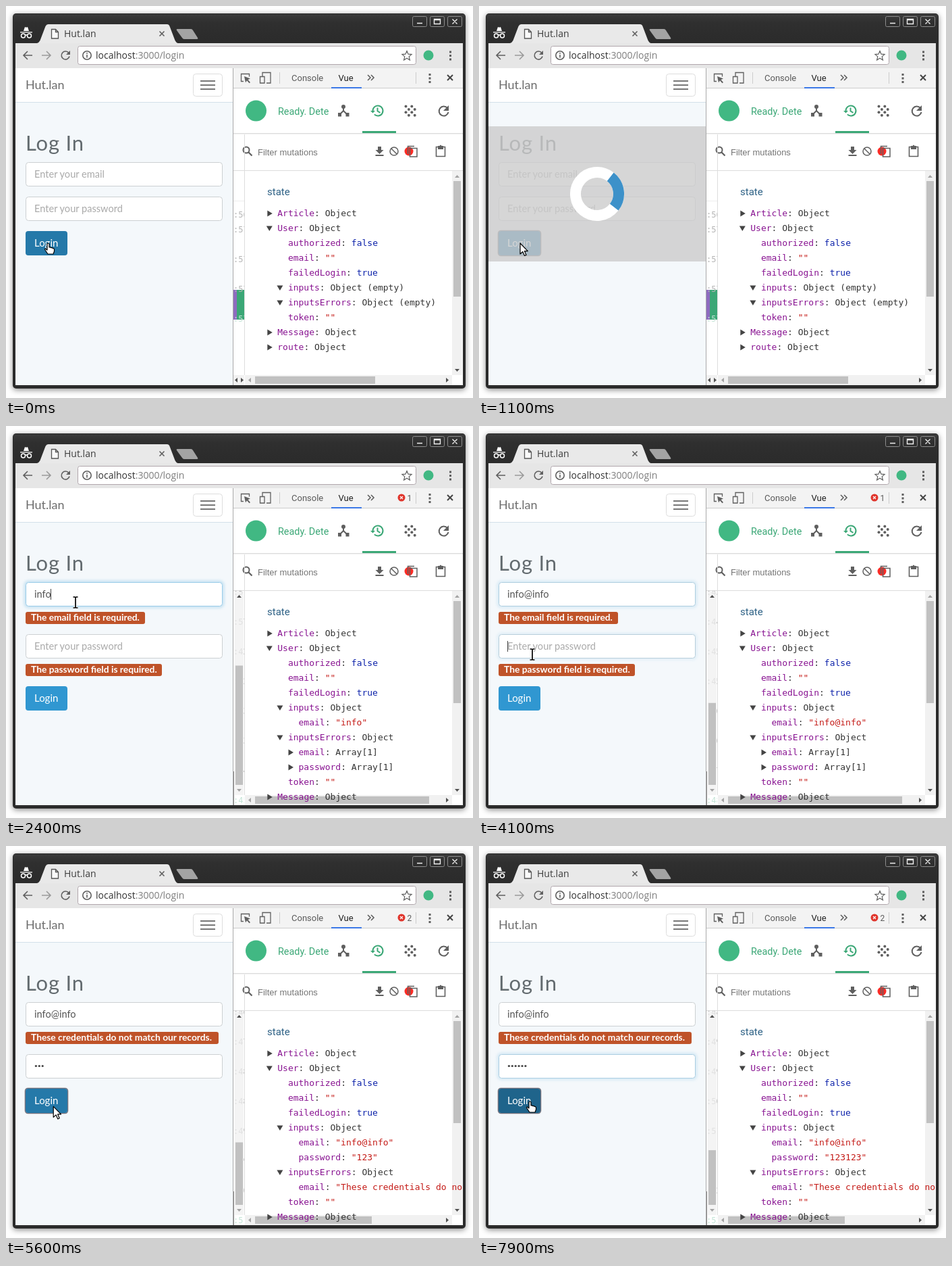
Animation of 692x580 px, one loop 8 s. Source, as an HTML page:

```html
<!DOCTYPE html>
<html lang="en">
<head>
<meta charset="utf-8">
<title>Login</title>
<style>
  html, body { margin: 0; width: 692px; height: 580px; overflow: hidden; background: #fefefe; }
  svg { display: block; }
  text { white-space: pre; }
  .ui { font-family: "Open Sans", sans-serif; font-size: 14px; }
  .page { font-family: Lato, sans-serif; font-size: 14.6px; fill: #555; }
  .tool { font-family: Roboto, sans-serif; font-size: 13px; fill: #5a5a5a; }
  .mono { font-family: "DejaVu Sans Mono", monospace; font-size: 13px; fill: #333; }
  .label { font-size: 13.8px; font-weight: 700; fill: #fff; }
  .key { fill: #881391; }
  .str { fill: #c41a16; }
  .bool { fill: #0d22aa; }
  .line { fill: none; stroke: #5f5f5f; stroke-width: 1.6; }
  .grey { fill: #5f5f5f; }
  .thumb { fill: #c1c1c1; }
</style>
</head>
<body>
<svg width="692" height="580" viewBox="0 0 692 580">
  <defs>
    <linearGradient id="bar" x2="0" y2="1">
      <stop offset="0" stop-color="#3b3b3b"/><stop offset=".3" stop-color="#2f2f2f"/><stop offset="1" stop-color="#2b2b2b"/>
    </linearGradient>
    <filter id="shadow" x="-5%" y="-5%" width="110%" height="110%"><feGaussianBlur stdDeviation="4"/></filter>
    <filter id="blur" x="-5%" y="-30%" width="110%" height="160%"><feGaussianBlur stdDeviation="2"/></filter>
    <clipPath id="statusClip"><rect x="400" y="140" width="78" height="30"/></clipPath>
    <clipPath id="treeClip"><rect x="354" y="244" width="322" height="317"/></clipPath>
    <clipPath id="listClip"><rect x="337" y="244" width="16" height="317"/></clipPath>
  </defs>

  <!-- window frame -->
  <rect x="10" y="13" width="671" height="555" rx="5" opacity=".45" filter="url(#shadow)"/>
  <rect x="10" y="11" width="671" height="555" rx="5" fill="#2b2b2b"/>
  <rect x="11" y="12" width="669" height="43" rx="4" fill="url(#bar)"/>
  <g fill="none" stroke="#8d8d8d">
    <rect x="602.5" y="15.5" width="21" height="15" rx="2"/>
    <rect x="628.5" y="15.5" width="21" height="15" rx="2"/>
    <rect x="654.5" y="15.5" width="21" height="15" rx="2"/>
    <path d="M609 25.5h8M634.5 19.5h9v7h-9zM634 20.5h10M661.5 19.5l7 7M668.5 19.5l-7 7" stroke="#f0f0f0" stroke-width="1.4"/>
  </g>
  <path d="M26 37l2-6 2 .8 2-.8 2 6zM21 38.2h18v1.4H21z" fill="#fff"/>
  <path d="M22.5 44a3 3 0 1 0 6 0a3 3 0 1 0-6 0M31.5 44a3 3 0 1 0 6 0a3 3 0 1 0-6 0M28.5 43.3q1.5-1 3 0" fill="none" stroke="#fff" stroke-width="1.5"/>
  <path d="M46 55q3-1 4.500-4l8-21q1.500-3 4-3h176q3 0 4 3l8 21q1.500 3 4 4z" fill="#e9e9e9"/>
  <path d="M254 34h20q2 0 3 2l7 11q1 2-1 2h-19q-2 0-3-2l-8-11q-1-2 1-2z" fill="#a3a3a3"/>
  <path d="M67.500 34.500h6l4 4v9.500h-10zM73.500 34.500v4h4" fill="#fafafa" stroke="#555" stroke-width="1.3"/>
  <text class="ui" x="86" y="46" fill="#3c3c3c">Hut.lan</text>
  <path class="line" d="M227.500 37.500l7 7M234.500 37.500l-7 7"/>

  <!-- address bar -->
  <rect x="14" y="55" width="663" height="37" fill="#e6e6e6"/>
  <path class="line" d="M39 73H26M32 67l-6 6 6 6" stroke-width="2"/>
  <path class="line" d="M53 73h13M60 67l6 6-6 6" style="stroke:#9b9b9b"/>
  <path class="line" d="M93 69.500a6 6 0 1 0 1 5"/><path class="grey" d="M95 66v6h-6z"/>
  <rect x="106.500" y="59.500" width="501" height="27" rx="3" fill="#fff" stroke="#b0a6ac"/>
  <circle class="line" cx="120" cy="73" r="6.200" stroke-width="1.300"/>
  <path class="line" d="M120 72v4.500M120 69v1.700"/>
  <text class="ui" x="133" y="78" fill="#333">localhost<tspan fill="#7d7d7d">:3000/login</tspan></text>
  <path class="line" d="M594 66.500l2 4.700 5 .4-3.800 3.300 1.200 5-4.400-2.700-4.400 2.700 1.200-5-3.800-3.300 5-.4z" style="stroke-width:1.200"/>
  <circle cx="626" cy="73" r="7.500" fill="#41b883"/>
  <path class="grey" d="M657 66.500h3v3h-3zM657 72h3v3h-3zM657 77.500h3v3h-3z"/>

  <!-- page -->
  <rect x="14" y="92" width="322" height="469" fill="#f4f8fb"/>
  <rect x="14" y="92" width="322" height="50" fill="#fff"/>
  <path d="M14 142.500h322" stroke="#d3e0e9"/>
  <text class="page" x="29" y="123" style="font-size:18px;fill:#6c6c6c">Hut.lan</text>
  <rect x="277.500" y="100.500" width="43" height="33" rx="4" fill="#fff" stroke="#ddd"/>
  <path d="M288 111h22M288 117h22M288 123h22" stroke="#777" stroke-width="2"/>
  <text class="page" x="29" y="214" style="font-size:31px;letter-spacing:.8px;fill:#636b6f">Log In</text>
  <g id="email"></g>
  <g id="pass"></g>
  <g id="emailErr"></g>
  <g id="passErr"></g>
  <g id="button">
    <rect id="ring" x="28.500" y="-.5" width="63" height="37" rx="4" fill="none" stroke="#77727c" stroke-width="1.600"/>
    <rect id="face" x="29" width="62" height="36" rx="4"/>
    <text class="page" x="42" y="23" style="font-size:15px;fill:#fff">Login</text>
  </g>
  <g id="loader">
    <rect id="veil" x="14" y="178" width="322" fill="#ccc" opacity=".8"/>
    <g id="spin" fill="none" stroke-width="16">
      <circle r="32" stroke="#fff"/>
      <circle r="32" stroke="#3d91c9" pathLength="4" stroke-dasharray="1 3" transform="rotate(-135)"/>
    </g>
  </g>

  <!-- developer tools -->
  <rect x="337" y="92" width="340" height="469" fill="#fff"/>
  <rect x="337" y="92" width="340" height="30" fill="#f3f3f3"/>
  <path d="M336.500 92v469" stroke="#a9a9a9"/>
  <path d="M337 121.500h340M405.500 98v17M607.500 98v17" stroke="#ccc"/>
  <path class="line" d="M352 111.500h-3.500v-11h12v4" style="stroke-width:1.300"/><path class="grey" d="M353 104l9 3.500-3.500 1.500 3.500 4-1.500 1.300-3.500-4-2 3z"/>
  <path class="line" d="M380 104v-5.500h12v15.500h-6M376.500 104.500h6.500v9.500h-6.500z" style="stroke-width:1.300"/>
  <text class="tool" x="423" y="111">Console</text>
  <text class="tool" x="492.500" y="111" style="fill:#222">Vue</text>
  <rect x="482" y="120" width="45" height="2" fill="#3b78e7"/>
  <path class="line" d="M536 102l4 4-4 4M541 102l4 4-4 4"/>
  <g id="badge">
    <circle cx="586" cy="106" r="5.500" fill="#e0342b"/>
    <path d="M584 104l4 4M588 104l-4 4" stroke="#fff" stroke-width="1.300"/>
    <text id="count" class="tool" x="594.500" y="110.500" style="font-size:12px"></text>
  </g>
  <path class="grey" d="M626.500 100h3v3h-3zM626.500 105.500h3v3h-3zM626.500 111h3v3h-3z"/>
  <path class="line" d="M654 102l8 8M662 102l-8 8" style="stroke:#444;stroke-width:2"/>

  <circle cx="370.500" cy="155" r="15.500" fill="#41b883"/>
  <g clip-path="url(#statusClip)"><text class="tool" x="403" y="161" style="font-size:14.400px;fill:#3ba776">Ready. Detected Vue</text></g>
  <path class="line" d="M500 150v5l-6 6M500 155l6 6" style="stroke-width:2"/>
  <path class="grey" d="M497 149a3 3 0 1 0 6 0a3 3 0 1 0-6 0M492 158h5v5.500h-5zM503.500 158h5v5.500h-5z"/>
  <g fill="none" stroke="#3ba776" stroke-width="2">
    <path d="M543.500 155a7.500 7.500 0 1 1 2.300 5.400M550.500 150.500v5l4 2.400"/>
    <path d="M540 155h7l-3.500 3.500z" fill="#3ba776" stroke="none"/>
  </g>
  <g id="grain" class="grey"></g>
  <path class="line" d="M654 151a7 7 0 1 0 1.500 6" style="stroke-width:2"/><path class="grey" d="M656 147v8h-8z"/>
  <path d="M337 188.500h340" stroke="#dcdcdc"/><path d="M337 189.500h340" stroke="#f0f0f0"/>
  <rect x="528" y="185" width="50" height="3" fill="#3ba776"/>

  <circle class="line" cx="356" cy="213" r="4.500" style="stroke-width:2"/><path class="line" d="M359.500 216.500l5 5" style="stroke-width:2.200"/>
  <text x="373" y="221" font-family="Liberation Sans, Arial, sans-serif" font-size="13" fill="#757575">Filter mutations</text>
  <path class="grey" d="M551 208h5v5h3.500l-6 6-6-6h3.500zM547.500 220h12v2h-12z"/>
  <path class="line" d="M569 215a6 6 0 1 0 12 0a6 6 0 1 0-12 0M571 211l8 8" style="stroke-width:1.500"/>
  <circle cx="597" cy="215" r="6.500" fill="#fb2c26"/>
  <path class="line" d="M595.500 219v-11.500h9.500M598.500 210.500h10.500v12.500h-10.500z" style="stroke-width:1.500"/>
  <path class="line" d="M637.500 208.500h13v14h-13z"/><path class="grey" d="M640 207h2.500q1.500-3 3 0h2.500v5h-8z"/>
  <path d="M337 243.500h340M353.500 190v356" stroke="#ddd"/>

  <!-- mutation list -->
  <g id="list" clip-path="url(#listClip)"></g>

  <!-- state tree -->
  <path d="M354 546h307v15H354zM661 244h15v302h-15z" fill="#f1f1f1"/>
  <rect class="thumb" id="hThumb" x="369" y="548" height="11"/>
  <rect class="thumb" id="vThumb" x="663" y="259" width="11"/>
  <path d="M665 254l3.500-4 3.500 4zM359 553.500l4-3.500v7z" fill="#a3a3a3"/>
  <path d="M665 537l3.500 4 3.500-4zM656 553.500l-4-3.500v7z" fill="#505050"/>
  <text class="tool" x="387" y="280" style="font-size:15px;fill:#2f6286">state</text>
  <g id="tree" clip-path="url(#treeClip)"></g>

  <!-- pointers -->
  <g id="cursor" stroke="#000" fill="#fff" stroke-linejoin="round">
    <path id="arrow" d="M0 0V16L3.800 12.500 6.500 18.500 9 17.400 6.400 11.600H11.300Z" stroke-width="1.200"/>
    <path id="hand" d="M0 1q1.500-2 3 0v5l1.500-.3 1.200 1 1.600-.2 1 1 1.500.2.7 1.300V12l-1.500 4H1L-3 10q-1-2 .5-2L0 10Z" stroke-width="1.200"/>
    <g id="beam" fill="none">
      <path d="M-3.500-8h2.500l1 1 1-1h2.500M0-7V7M-3.500 8h2.500l1-1 1 1h2.500" stroke="#fff" stroke-width="3.500"/>
      <path d="M-3.500-8h2.500l1 1 1-1h2.500M0-7V7M-3.500 8h2.500l1-1 1 1h2.500" stroke-width="1.700"/>
    </g>
  </g>
</svg>
<script>
const LOOP = 8000, EMAIL = 'info@info', PASSWORD = '123123';
const MISMATCH = 'These credentials do not match our records.';
const $ = id => document.getElementById(id);
const clamp = v => Math.max(0, Math.min(1, v));
const set = (id, attrs) => { for (const k in attrs) $(id).setAttribute(k, attrs[k]); };
const show = (id, on) => { $(id).style.display = on ? '' : 'none'; };
const within = (t, spans) => spans.some(([a, b]) => t >= a && t < b);
const stepAt = (table, t) => table.reduce((v, [at, next]) => t >= at ? next : v, table[0][1]);
const countAt = (times, t) => times.filter(at => t >= at).length;

const cache = {};
function html(id, markup) {
  if (cache[id] !== markup) $(id).innerHTML = cache[id] = markup;
}

const emailKeys = [2000, 2100, 2200, 2400, 2700, 3000, 3100, 3500, 3700];
const passKeys = [4300, 4400, 4500, 6600, 6700, 6800];
const emailFocus = [[1880, 4040]];
const passFocus = [[4040, 5020], [6120, 7850]];
const passCaret = [[4040, 5000], [6120, 7300]];
const loading = [[600, 1300], [5200, 5500]];
const results = [1300, 5500];
const faces = [[0, 'hover'], [500, 'press'], [600, 'focus'], [1880, 'idle'], [4880, 'hover'],
  [5000, 'press'], [5200, 'focus'], [6120, 'idle'], [7650, 'hover'], [7870, 'press']];
const faceFill = { idle: '#3097d1', hover: '#2579a9', focus: '#2579a9', press: '#1f648b' };
const pointers = [[0, 'hand'], [600, 'arrow'], [1400, 'beam'], [4750, 'arrow'], [4880, 'hand'],
  [5080, 'arrow'], [5680, 'beam'], [6900, 'arrow'], [7600, 'hand']];
const path = [[0, 61, 351], [1400, 61, 351], [1600, 109, 266], [1700, 103, 261], [3750, 103, 261],
  [4050, 79, 338], [4600, 79, 338], [4900, 61, 403], [5500, 61, 403], [5800, 96, 336],
  [6850, 96, 336], [7000, 89, 362], [7450, 89, 362], [7700, 74, 378], [LOOP, 74, 378]];

function pointAt(t) {
  const i = path.findIndex(p => p[0] > t);
  const [a, b] = [path[i - 1], path[i]];
  const u = (t - a[0]) / (b[0] - a[0]), e = u * u * (3 - 2 * u);
  return [a[1] + (b[1] - a[1]) * e, a[2] + (b[2] - a[2]) * e];
}

// Focus strength with the 150 ms border transition.
const glowAt = (t, spans) =>
  Math.max(...spans.map(([a, b]) => clamp((t - a) / 150) * (1 - clamp((t - b) / 150))));

const mix = (a, b, u) => `rgb(${a.map((v, i) => Math.round(v + (b[i] - v) * u))})`;

const makeField = (id, hint) => html(id, `
  <rect id="${id}Glow" x="29" width="292" height="36" rx="4" fill="none" stroke="#98cbe8" stroke-width="4" filter="url(#blur)"/>
  <rect id="${id}Box" x="29.5" y=".5" width="291" height="35" rx="4" fill="#fff"/>
  <text id="${id}Hint" class="page" x="42" y="23" style="fill:#aaa">${hint}</text>
  <text id="${id}Text" class="page" x="42" y="23"></text>
  <g id="${id}Dots" fill="#444"></g>
  <path id="${id}Caret" d="M.5 10v16" stroke="#444"/>`);

function drawField(id, y, glow, empty, caretX) {
  set(id, { transform: `translate(0 ${y})` });
  set(id + 'Glow', { opacity: glow * .6 });
  set(id + 'Box', { stroke: mix([204, 208, 210], [152, 203, 232], glow) });
  show(id + 'Hint', empty);
  show(id + 'Caret', caretX > 0);
  set(id + 'Caret', { transform: `translate(${Math.floor(caretX)} 0)` });
}

const errorLabel = (y, width, message) => message && `
  <rect x="29" y="${y}" width="${width}" height="18" rx="3" fill="#bf5329"/>
  <text class="page label" x="37" y="${y + 13}">${message}</text>`;

const obj = (level, key, open, note = '') => ({ level, key, open, value: 'Object' + note });
const leaf = (level, key, value, cls) => ({ level, key, value, cls });

function treeRows(email, pass, result) {
  const inputs = [], errors = [];
  if (email) inputs.push(leaf(2, 'email', `"${email}"`, 'str'));
  if (pass) inputs.push(leaf(2, 'password', `"${pass}"`, 'str'));
  if (result === 1) for (const key of ['email', 'password'])
    errors.push({ level: 2, key, open: false, value: 'Array[1]' });
  if (result === 2) errors.push(leaf(2, 'email', `"${MISMATCH}"`, 'str'));
  const note = list => list.length ? '' : ' (empty)';
  return [
    obj(0, 'Article', false), obj(0, 'User', true),
    leaf(1, 'authorized', 'false', 'bool'), leaf(1, 'email', '""', 'str'), leaf(1, 'failedLogin', 'true', 'bool'),
    obj(1, 'inputs', true, note(inputs)), ...inputs,
    obj(1, 'inputsErrors', true, note(errors)), ...errors,
    leaf(1, 'token', '""', 'str'), obj(0, 'Message', false), obj(0, 'route', false)
  ];
}

function treeMarkup(rows) {
  return rows.map((row, i) => {
    const x = 402.3 + row.level * 15.6, y = 307 + i * 22;
    const arrow = row.open === undefined ? '' : `<path fill="#444" transform="translate(${x - 12} ${y})"
      d="${row.open ? 'M-4.5-3.500h9L0 4z' : 'M-3-4.500v9L4.500 0z'}"/>`;
    return `${arrow}<text class="mono" x="${x}" y="${y + 4}"><tspan class="key">${row.key}</tspan>: <tspan class="${row.cls || ''}">${row.value}</tspan></text>`;
  }).join('');
}

// Sliver of the mutation list: rows 44 px tall, kept scrolled to the end.
function listMarkup(count) {
  const scrolled = count > 7;
  const top = scrolled ? 553 - 44 * (count - 1) : 286;
  let out = '';
  if (!scrolled) {
    const y = top + 44 * count - 86 + 44;
    out += `<path d="M337 288.500h16" stroke="#eee"/><path d="M337 ${y - 44}h5v44h-5z" fill="#8e6bbf"/>
      <path d="M342 ${y - 44}h11v44h-11z" fill="#3ba776"/>`;
  }
  for (let i = scrolled ? count - 8 : 0; i < count; i++) {
    const y = !i ? 308 : top + 44 * i;
    const sec = i < 5 ? 56 + (i > 0) : Math.floor(42 + (i - 5) * .6);
    const fill = i === count - 1 ? '#c4e4d6' : '#b5b5b5';
    out += `<text class="mono" x="337" y="${y + 5}" style="font-size:12px;fill:${fill}">:${sec}</text>`;
  }
  if (scrolled) {
    const size = 1942 / count;
    out += `<path d="M339 245h13v301h-13z" fill="#f1f1f1" opacity=".75"/>
      <path class="thumb" d="M340 ${531 - size}h11v${size}h-11z"/>
      <path d="M342 254l3.500-4 3.500 4z" fill="#505050"/><path d="M342 537l3.500 4 3.500-4z" fill="#a3a3a3"/>
      <path d="M337.500 511v50" stroke="#888"/>`;
  } else {
    out += `<path d="M337 546h16v15h-16z" fill="#f1f1f1"/>
      <path d="M339 553.500l4-3.500v7zM352 553.500l-4-3.500v7z" fill="#505050"/>`;
  }
  return out;
}

function draw(t) {
  const email = EMAIL.slice(0, countAt(emailKeys, t));
  const pass = PASSWORD.slice(0, countAt(passKeys, t));
  const result = countAt(results, t);
  const passY = result ? 308 : 282;
  const buttonY = [333, 385, 359][result];

  $('emailText').textContent = email;
  const emailEnd = 42 + $('emailText').getComputedTextLength();
  drawField('email', 231, glowAt(t, emailFocus), !email, within(t, emailFocus) ? emailEnd : 0);
  html('passDots', [...pass].map((_, i) => `<circle cx="${44.4 + i * 4.9}" cy="17.500" r="1.600"/>`).join(''));
  drawField('pass', passY, glowAt(t, passFocus), !pass, within(t, passCaret) ? 42 + pass.length * 4.9 : 0);
  html('emailErr', errorLabel(275, result === 2 ? 286 : 177, ['', 'The email field is required.', MISMATCH][result]));
  html('passErr', errorLabel(352, 202, result === 1 ? 'The password field is required.' : ''));

  const face = stepAt(faces, t);
  set('button', { transform: `translate(0 ${buttonY})` });
  set('face', { fill: faceFill[face] });
  show('ring', face === 'press' || face === 'focus');

  const height = buttonY + 45 - 178;
  show('loader', within(t, loading));
  set('veil', { height });
  const turn = (t - (result ? 5240 : 640)) * .18;
  set('spin', { transform: `translate(175 ${178 + height / 2}) rotate(${turn})` });

  show('badge', result > 0);
  $('count').textContent = result;
  const rows = treeRows(email, pass, result);
  html('tree', treeMarkup(rows));
  set('vThumb', { height: Math.round(85158 / (278 + 22 * rows.length)) });
  set('hThumb', { width: [178, 258, 173][result] });
  html('list', listMarkup(5 + result * 2 + email.length + pass.length));

  const kind = stepAt(pointers, t);
  for (const id of ['arrow', 'hand', 'beam']) show(id, id === kind);
  const [x, y] = pointAt(t);
  set('cursor', { transform: `translate(${x} ${y})` });
}

makeField('email', 'Enter your email');
makeField('pass', 'Enter your password');
let dots = '';
for (let r = 0; r < 4; r++) for (let c = 0; c < 4; c++)
  if ((r + c) % 2 === 0) dots += `<circle cx="${592.5 + c * 4.4}" cy="${148.500 + r * 4.4}" r="2"/>`;
$('grain').innerHTML = dots;

function tick() {
  draw(performance.now() % LOOP);
  requestAnimationFrame(tick);
}
tick();
</script>
</body>
</html>
```
